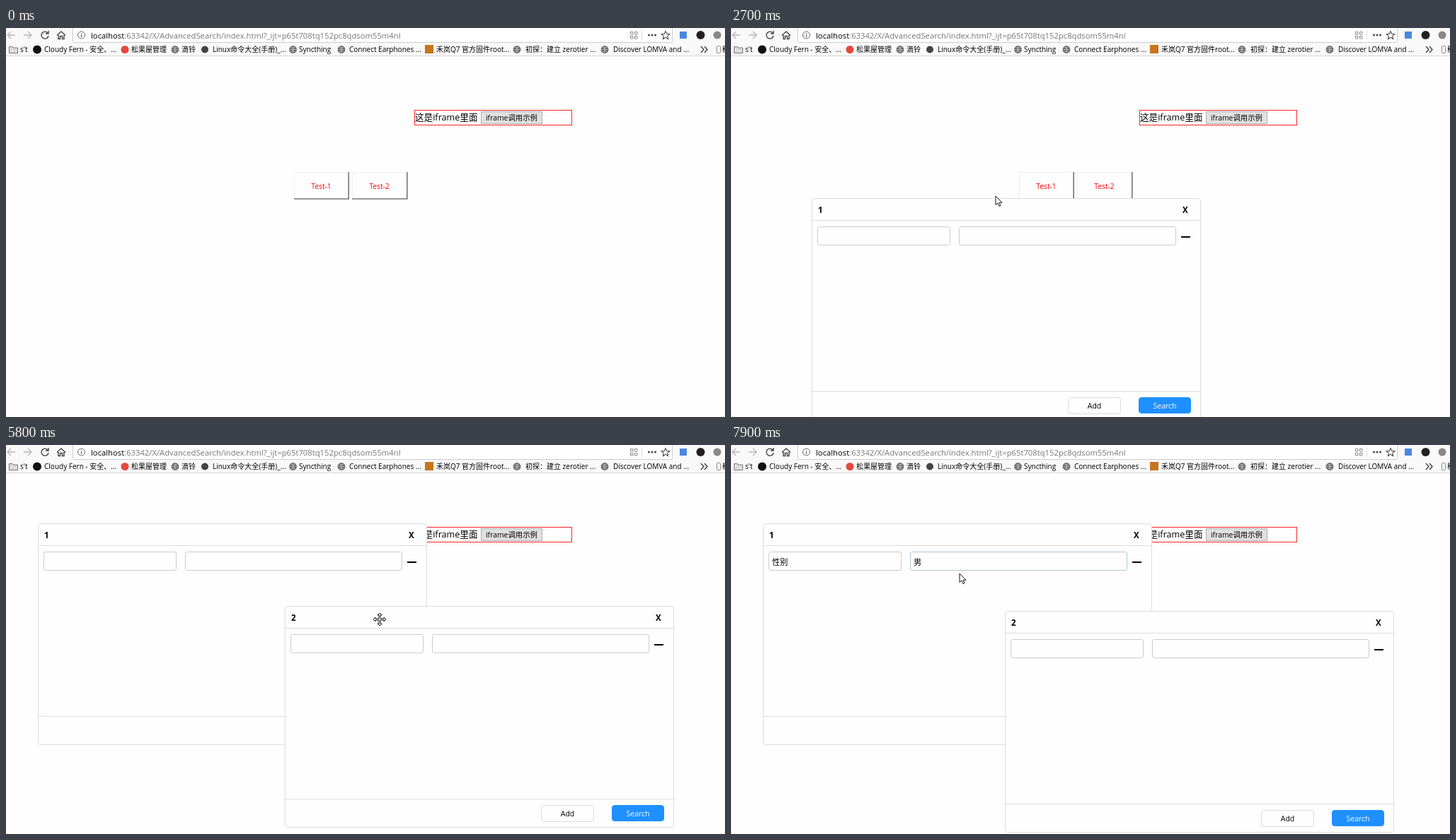
An HTML page for the animation above (8000 ms loop, 1016x551 px).

```html
<!DOCTYPE html>
<html lang="zh">
<head>
<meta charset="utf-8">
<title>Advanced search</title>
<style>
html, body { margin: 0; width: 100%; height: 100%; overflow: hidden; background: #fefefe; }
body { font-family: "Open Sans", "Noto Sans CJK SC", "Noto Sans CJK", sans-serif; }
#stage { position: absolute; left: 0; top: 0; width: 1016px; height: 551px; overflow: hidden; }
#page, .dialog, .dialog *, #cursor { position: absolute; box-sizing: border-box; }
#page { left: 0; top: 0; }

.moving { animation: 8s step-end -5ms infinite; }

.dialog { left: 0; top: 0; width: 550px; height: 314px; border: 1px solid #dcdcdc; border-radius: 4px;
  background: #fefefe; color: #000; font-size: 10.45px; }
.dialog > * { margin: -1px 0 0 -1px; }
.title, .close { top: 8px; font-weight: 700; font-size: 11.5px; line-height: 18px; }
.title { left: 9px; }
.close { left: 524px; }
.body { left: 1px; top: 31px; width: 548px; height: 243px; border: solid #dcdcdc; border-width: 1px 0; }
.field { top: 40px; height: 27px; border: 1px solid #ccc; border-radius: 3px; padding-left: 4px; line-height: 27px; }
.field, .list { font-size: 11.2px; }
.name { left: 8px; width: 188px; }
.value { left: 208px; width: 307px; }
.remove { left: 522px; top: 54px; width: 13px; height: 2px; background: #000; }
.btn { top: 282px; height: 24px; line-height: 23px; border: 1px solid #dcdcdc; border-radius: 4px; text-align: center; }
.add { left: 362px; width: 75px; }
.search { left: 462px; width: 74px; height: 23px; border-color: #1e90ff; background: #1e90ff; color: #fff; }
.list { top: 67px; padding: 0 1px; border: 1px solid #ccc; border-radius: 2px; background: #fafafa; box-shadow: 0 1px 4px #0002; }
.list div { position: static; height: 27px; padding-left: 7px; line-height: 28px; }
.list.name { width: 190px; height: 111px; }
.list.value { height: 56px; }
.caret { left: 5px; top: 5px; width: 1px; height: 15px; background: #000; }

#one { animation-name: one; }
#two { animation-name: two; }
#cursor { left: 0; top: 0; overflow: visible; animation-name: pointer; }
.arrow { animation-name: arrow; }
.move { animation-name: move; }
.hand { animation-name: hand; }
.list.name { animation-name: nameList; }
.list.value { animation-name: valueList; }
.list.name div:first-child { animation-name: nameHover; }
.list.value div:first-child { animation-name: valueHover; }
.gender { animation-name: gender; }
.male { animation-name: male; }
.caret { animation-name: valueList; }
.name.focus { animation-name: nameFocus; }
.value.focus { animation-name: valueFocus; }

@keyframes one {
  0% { visibility: hidden; translate: 257px 141px; }
  15% { visibility: visible; }
  18.75% { translate: 257px 141px; animation-timing-function: steps(4); }
  23.75% { translate: 136px 141px; }
  25% { translate: 111px 137px; animation-timing-function: steps(2); }
  27.5% { translate: 89px 122px; }
  28.75% { translate: 84px 162px; animation-timing-function: steps(2); }
  31.25% { translate: 114px 241px; }
  52.5% { translate: 114px 241px; animation-timing-function: steps(4); }
  57.5% { translate: 89px 212px; }
  58.75% { translate: 89px 212px; animation-timing-function: steps(4); }
  63.75%, 100% { translate: 45px 111px; }
  100% { visibility: visible; }
}
@keyframes two {
  0% { visibility: hidden; translate: 257px 141px; }
  37.5% { visibility: visible; }
  41.25% { translate: 257px 141px; animation-timing-function: steps(3); }
  45% { translate: 364px 153px; animation-timing-function: steps(3); }
  48.75% { translate: 424px 155px; }
  70% { translate: 424px 155px; animation-timing-function: steps(2); }
  72.5% { translate: 394px 228px; animation-timing-function: steps(2); }
  75%, 100% { translate: 387px 235px; }
  100% { visibility: visible; }
}
@keyframes pointer {
  0% { translate: 263px 40px; }
  1.25% { translate: 263px 40px; animation-timing-function: steps(2); }
  3.75% { translate: 800px 261px; }
  5% { translate: 931px 197px; animation-timing-function: steps(2); }
  7.5% { translate: 611px 258px; }
  8.75% { translate: 546px 242px; animation-timing-function: steps(2); }
  11.25% { translate: 430px 243px; }
  15% { translate: 430px 243px; animation-timing-function: steps(3); }
  18.75% { translate: 441px 163px; animation-timing-function: steps(4); }
  23.75% { translate: 304px 162px; }
  25% { translate: 290px 156px; animation-timing-function: steps(2); }
  27.5% { translate: 272px 146px; }
  28.75% { translate: 264px 182px; animation-timing-function: steps(2); }
  31.25% { translate: 303px 270px; animation-timing-function: steps(2); }
  33.75% { translate: 374px 238px; animation-timing-function: steps(2); }
  36.25% { translate: 537px 226px; }
  37.5% { translate: 537px 226px; animation-timing-function: steps(2); }
  40% { translate: 391px 160px; }
  41.25% { translate: 391px 160px; animation-timing-function: steps(3); }
  45% { translate: 497px 166px; animation-timing-function: steps(3); }
  48.75% { translate: 557px 175px; animation-timing-function: steps(3); }
  52.5% { translate: 286px 260px; animation-timing-function: steps(4); }
  57.5% { translate: 243px 204px; }
  58.75% { translate: 243px 204px; animation-timing-function: steps(4); }
  63.75% { translate: 217px 130px; animation-timing-function: steps(5); }
  70% { translate: 557px 174px; animation-timing-function: steps(2); }
  72.5% { translate: 528px 247px; animation-timing-function: steps(2); }
  75% { translate: 519px 253px; animation-timing-function: steps(4); }
  80% { translate: 150px 160px; }
  81.25% { translate: 150px 160px; animation-timing-function: steps(3); }
  85% { translate: 120px 188px; }
  86.25% { translate: 120px 188px; animation-timing-function: steps(3); }
  90% { translate: 300px 164px; animation-timing-function: steps(3); }
  93.75% { translate: 285px 197px; }
  96.25% { translate: 285px 197px; animation-timing-function: steps(2); }
  98.75%, 100% { translate: 323px 182px; }
}
@keyframes arrow {
  0%, 17.5%, 40%, 52.5%, 70%, 83.75%, 92.5% { opacity: 0; }
  1.25%, 32.5%, 50%, 65%, 76.25%, 87.5%, 97.5%, 100% { opacity: 1; }
}
@keyframes move {
  0%, 32.5%, 50%, 65%, 76.25%, 100% { opacity: 0; }
  17.5%, 40%, 52.5%, 70% { opacity: 1; }
}
@keyframes hand {
  0%, 87.5%, 97.5%, 100% { opacity: 0; }
  83.75%, 92.5% { opacity: 1; }
}
@keyframes nameList { 0%, 86.25%, 100% { opacity: 0; } 81.25% { opacity: 1; } }
@keyframes valueList { 0%, 96.25%, 100% { opacity: 0; } 90% { opacity: 1; } }
@keyframes nameHover { 0%, 100% { background: #fafafa; } 83.75% { background: #e6f2fc; } }
@keyframes valueHover { 0%, 100% { background: #fafafa; } 95% { background: #eef2f6; } }
@keyframes gender { 0% { opacity: 0; } 86.25%, 100% { opacity: 1; } }
@keyframes male { 0% { opacity: 0; } 96.25%, 100% { opacity: 1; } }
@keyframes nameFocus { 0%, 86.25%, 100% { border-color: #ccc; } 81.25% { border-color: #a9c4da; } }
@keyframes valueFocus { 0% { border-color: #ccc; } 90%, 100% { border-color: #b4c4d2; } }
</style>
</head>
<body>
<div id="stage">
<svg id="page" width="1016" height="551" viewBox="0 0 1016 551">
  <defs>
    <g id="globe">
      <circle r="5.4" fill="#666"/>
      <path d="M-4.5 0H4.5M0-4.5V4.5M-3.2-3Q0-1 3.2-3M-3.2 3Q0 1 3.2 3" fill="none" stroke="#ccc" stroke-width=".8"/>
    </g>
  </defs>
  <rect width="1016" height="40" fill="#f9f9fa"/>
  <path d="M0 39.5H1016" stroke="#d8d8d8"/>
  <rect x="94.5" y="-2.5" width="847" height="23" rx="2" fill="#fff" stroke="#ccc"/>
  <g fill="none" stroke="#444" stroke-width="1.4">
    <path d="M13 10H2M7 5 2 10 7 15M25 10H36M31 5 36 10 31 15" stroke="#b8b8b8"/>
    <path d="M59 7A5 5 0 1 0 60 11M60 4V8H56"/>
    <path d="M72 10.5 78 5 84 10.5M74 10V15.5H76.5V11.5H79.5V15.5H82V10"/>
    <circle cx="106.5" cy="10" r="5" stroke="#666" stroke-width="1"/>
    <path d="M106.5 9V13M106.5 7V8" stroke="#666" stroke-width="1.2"/>
    <path d="M932 4.5 933.7 8.3 937.8 8.7 934.7 11.4 935.6 15.5 932 13.3 928.4 15.5 929.3 11.4 926.2 8.7 930.3 8.3Z" stroke-width="1.1"/>
    <path d="M882.5 5.5H886V9H882.5ZM888.5 5.5H892V9H888.5ZM882.5 11.5H886V15H882.5ZM888.5 11.5H892V15H888.5Z" stroke="#888" stroke-width="1"/>
    <path d="M898.5 3V17" stroke="#ddd" stroke-width="1"/>
    <path d="M982 26 986 30.5 982 35M987 26 991 30.5 987 35"/>
    <rect x="1004.5" y="25.5" width="5" height="10" rx="1" stroke="#888" stroke-width="1"/>
    <path d="M4.5 26.5H9L10 28H16.5V35.5H4.5Z" fill="#ddd" stroke="#777" stroke-width="1"/>
  </g>
  <g fill="#444"><circle cx="908.5" cy="10" r="1.5"/><circle cx="913" cy="10" r="1.5"/><circle cx="917.5" cy="10" r="1.5"/></g>
  <rect x="952" y="5" width="10" height="10" fill="#4a87e0"/>
  <circle cx="981.5" cy="10" r="6" fill="#222"/>
  <circle cx="1005" cy="10" r="5.5" fill="#888"/>
  <text x="120" y="14.5" font-size="11.25" fill="#777"><tspan fill="#000">localhost</tspan>:63342/X/AdvancedSearch/index.html?_ijt=p65t708tq152pc8qdsom55m4nl</text>

  <circle cx="44" cy="30.5" r="6" fill="#111"/>
  <circle cx="168" cy="30.5" r="5.5" fill="#e5483d"/>
  <circle cx="281" cy="30.5" r="5" fill="#444"/>
  <rect x="592" y="24" width="12" height="12" fill="#c8741c"/>
  <use href="#globe" x="239" y="30.5"/>
  <use href="#globe" x="405.5" y="30.5"/>
  <use href="#globe" x="474" y="30.5"/>
  <use href="#globe" x="722" y="30.5"/>
  <use href="#globe" x="846" y="30.5"/>
  <g font-size="10" fill="#000">
    <text x="20" y="34">s't</text>
    <text x="54" y="34">Cloudy Fern - 安全、...</text>
    <text x="177" y="34">松果屋管理</text>
    <text x="248" y="34">滴铃</text>
    <text x="292" y="34">Linux命令大全(手册)_...</text>
    <text x="414" y="34">Syncthing</text>
    <text x="485" y="34">Connect Earphones ...</text>
    <text x="608" y="34">禾岚Q7 官方固件root...</text>
    <text x="734" y="34">初探：建立 zerotier ...</text>
    <text x="858" y="34">Discover LOMVA and ...</text>
    <text x="1012" y="34">移</text>
  </g>

  <rect x="577.5" y="116.5" width="222" height="21" fill="none" stroke="#f22"/>
  <text x="578" y="131" font-size="12.6" fill="#000">这是iframe里面</text>
  <rect x="671.5" y="118.5" width="86" height="17" fill="#e1e1e1" stroke="#adadad"/>
  <text x="714.5" y="131" font-size="10.4" text-anchor="middle" fill="#000">iframe调用示例</text>

  <g font-size="10.3" fill="red" text-anchor="middle">
    <path d="M407.5 242V204.5H484M489.5 242V204.5H566" fill="none" stroke="#eee"/>
    <path d="M407 242H484.2V204M489 242H566.8V204" fill="none" stroke="#757575" stroke-width="1.6"/>
    <text x="445.5" y="228">Test-1</text>
    <text x="527.5" y="228">Test-2</text>
  </g>
</svg>

<div class="dialog moving" id="one">
  <div class="body"></div>
  <b class="title">1</b><b class="close">X</b>
  <div class="field name focus moving"><span class="gender moving">性别</span></div>
  <div class="field value focus moving"><span class="male moving">男</span><i class="caret moving"></i></div>
  <div class="remove"></div>
  <div class="btn add">Add</div><div class="btn search">Search</div>
  <div class="list name moving"><div class="moving">性别</div><div>姓名</div><div>年龄</div><div>地址</div></div>
  <div class="list value moving"><div class="moving">男</div><div>女</div></div>
</div>

<div class="dialog moving" id="two">
  <div class="body"></div>
  <b class="title">2</b><b class="close">X</b>
  <div class="field name"></div>
  <div class="field value"></div>
  <div class="remove"></div>
  <div class="btn add">Add</div><div class="btn search">Search</div>
</div>

<svg id="cursor" class="moving" width="1" height="1" fill="#fff" stroke="#111">
  <path class="arrow moving" d="M0 0V12.5L3 10 5 14.5 7 13.6 5 9.3H9Z"/>
  <path class="move moving" d="M0-9 3-6H1V-1H6V-3L9 0 6 3V1H1V6H3L0 9-3 6H-1V1H-6V3L-9 0-6-3V-1H-1V-6H-3Z"/>
  <path class="hand moving" d="M-1.5 1.2a1.5 1.5 0 0 1 3 0V6q1.3-.8 2.3.3 1.3-.6 2.1.5 1.6-.3 1.6 1.4V12q0 2-1.5 4V18H-1.5V16.5L-5.5 11q-.4-1.8 1.2-1.7L-1.5 11.5Z"/>
</svg>
</div>
</body>
</html>
```
